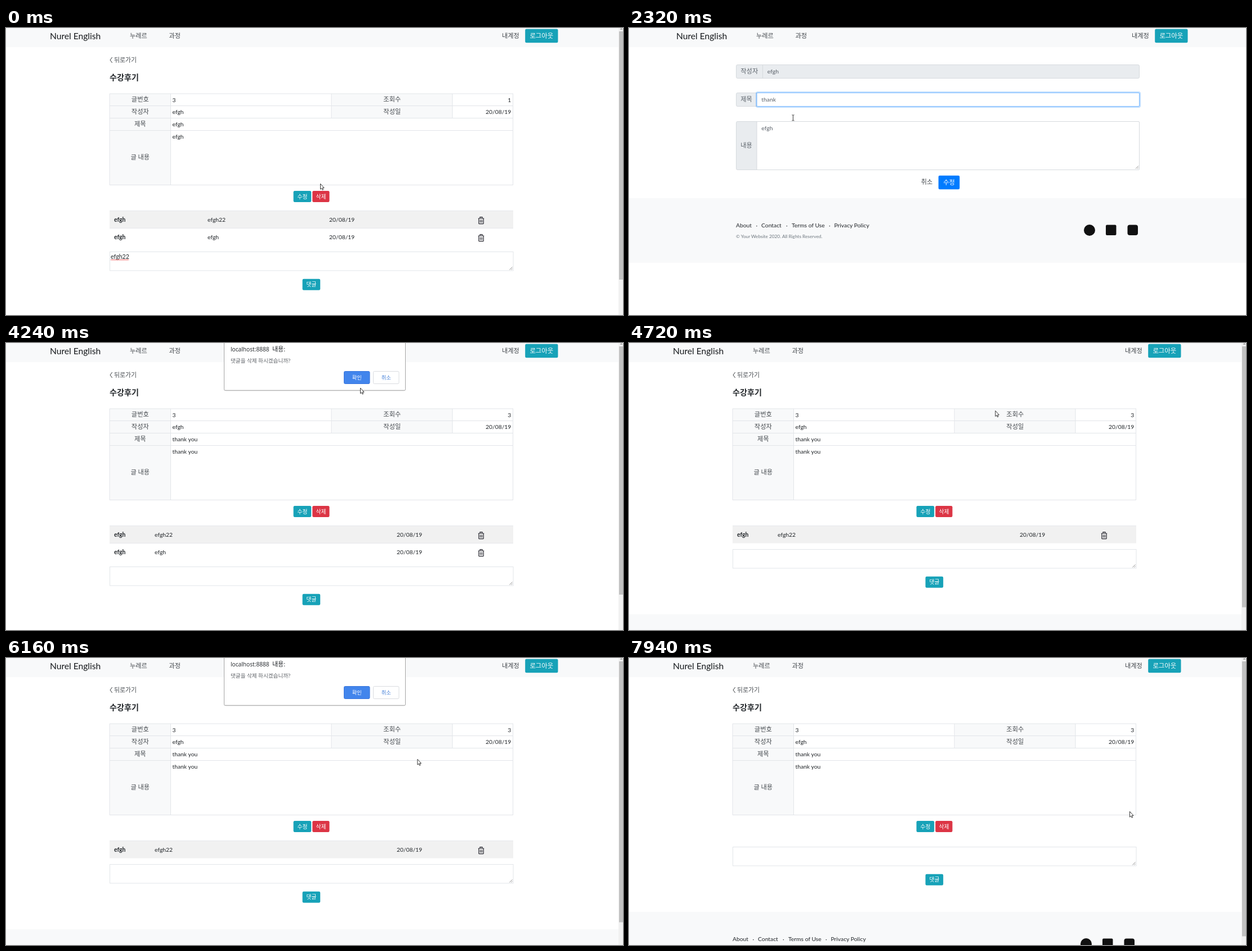
An HTML page for the animation above (8000 ms loop, 1096 px wide and 511 px high).

```html
<!DOCTYPE html>
<html lang="ko">
<head>
<meta charset="utf-8">
<title>수강후기</title>
<style>
  html, body { margin: 0; width: 100%; height: 100%; overflow: hidden; background: #fff; }
  svg { display: block; width: 1096px; height: 511px; }
  text { font-family: Lato, "Noto Sans CJK KR", "Noto Sans CJK", sans-serif; white-space: pre; }
  .ui { font-family: "Open Sans", "Noto Sans CJK KR", sans-serif; }
</style>
</head>
<body>
<svg viewBox="0 0 1096 511">
  <g id="page"></g>
  <circle id="click" r="9" fill="#ffdc1e" fill-opacity=".62"/>
  <g id="pointer"></g>
</svg>
<script>
const LOOP = 8000;
const BRAND = 'Nurel English', MENU = '누레르', USER = 'efgh';
const INK = '#212529', SOFT = '#44494e', MUTED = '#596068';
const LINE = '#e2e5e9', EDGE = '#d6dade', PALE = '#f8f9fa', TEAL = '#17a2b8';
const LATIN = 10.33, HANGUL = 11.2, SMALL = 9.8;

// time, changes to the state from then on
const STEPS = [
  [0, { page: 'view', views: 1, title: USER, body: USER, rows: 2, cols: [358, 574],
        draft: USER + '22', dialog: false, focus: '', selected: false }],
  [690, { focus: 'edit' }],
  [1090, { page: 'form', focus: '' }],
  [1850, { focus: 'title' }],
  [1990, { selected: true }],
  [2240, { selected: false, typing: 'title' }],
  [2420, { title: 'thank you', typing: 'body', focus: 'body' }],
  [2600, { body: 'thank you', typing: '' }],
  [2700, { page: 'view', views: 3, cols: [264, 694], draft: '', focus: '' }],
  [4050, { dialog: true }],
  [4430, { dialog: false }],
  [4570, { rows: 1 }],
  [5860, { dialog: true }],
  [7280, { dialog: false }],
  [7420, { rows: 0 }],
];

// time, x, y, pointer shape from then on
const PATH = [
  [0, 558, 277, 'arrow'], [80, 558, 277, 'arrow'], [200, 556, 293, 'hand'], [300, 550, 304, 'hand'],
  [420, 530, 306, 'hand'], [540, 522, 297, 'hand'], [1320, 522, 297, 'arrow'], [1400, 480, 258, 'beam'],
  [1560, 378, 166, 'arrow'], [1630, 355, 140, 'arrow'], [1780, 355, 140, 'arrow'], [1850, 343, 129, 'beam'],
  [2090, 219, 127, 'beam'], [2240, 219, 127, 'beam'], [2420, 380, 200, 'beam'], [2520, 560, 260, 'hand'],
  [2600, 565, 274, 'hand'], [2720, 564, 273, 'arrow'], [2850, 564, 273, 'arrow'], [3090, 572, 277, 'arrow'],
  [3500, 700, 318, 'arrow'], [3880, 825, 360, 'arrow'], [3960, 844, 371, 'arrow'], [4050, 844, 371, 'arrow'],
  [4240, 629, 80, 'arrow'], [4310, 629, 62, 'arrow'], [4450, 629, 62, 'arrow'], [4720, 650, 120, 'arrow'],
  [5000, 740, 232, 'arrow'], [5300, 861, 339, 'arrow'], [5540, 851, 344, 'arrow'], [5860, 850, 343, 'arrow'],
  [6150, 735, 185, 'arrow'], [6400, 632, 70, 'arrow'], [6540, 629, 64, 'arrow'], [6710, 629, 64, 'arrow'],
  [6780, 629, 62, 'arrow'], [7300, 629, 62, 'arrow'], [7500, 740, 110, 'arrow'], [7700, 866, 227, 'arrow'],
  [7780, 873, 241, 'arrow'], [7940, 889, 273, 'arrow'], [LOOP, 889, 273, 'arrow'],
];

const CLICKS = [[690, 810], [1850, 1990], [2610, 2700], [3960, 4050], [4320, 4430], [5770, 5860], [7100, 7280]];

const POINTERS = {
  arrow: '<path d="M.5 .3V10.2L2.7 8.2L4.1 11.4L5.7 10.7L4.3 7.6H7.1Z" fill="#fff" stroke="#222" stroke-width=".9"/>',
  hand: `<path d="M-1.1 9V1Q0 -.6 1.1 1V5Q2.4 4 3.2 5.4Q4.4 4.6 5.1 6Q6.7 5.6 6.6 7.4V10
    Q6.4 12 5.2 13.6H-.2Q-1.4 11.4 -3.6 9Q-4 7.2 -2.3 7.6Z" fill="#fff" stroke="#222" stroke-width=".9"/>`,
  beam: '<path d="M-2 -5H-.5L0 -4.5L.5 -5H2M0 -4.5V4.5M-2 5H-.5L0 4.5L.5 5H2" fill="none" stroke="#222" stroke-width=".9"/>',
};

const rect = (x, y, w, h, fill, more = '') =>
  `<rect x="${x}" y="${y}" width="${w}" height="${h}" fill="${fill}" ${more}/>`;
const box = (x, y, w, h, stroke = LINE, r = 0, fill = '#fff') =>
  rect(x + .5, y + .5, w - 1, h - 1, fill, `stroke="${stroke}" rx="${r}"`);
const text = (s, x, y, size = LATIN, fill = INK, more = '') =>
  `<text x="${x}" y="${y}" font-size="${size}" fill="${fill}" ${more}>${s}</text>`;
const centred = (s, x, y, size = HANGUL, fill = INK) => text(s, x, y, size, fill, 'text-anchor="middle"');
const right = (s, x, y) => text(s, x, y, LATIN, INK, 'text-anchor="end"');
const stroke = (d, color, width = 1) => `<path d="${d}" fill="none" stroke="${color}" stroke-width="${width}"/>`;
const ring = (x, y, w, h, color) => rect(x - 1, y - 1, w + 2, h + 2, 'none', `rx="3" stroke="${color}" stroke-width="2.2"`);
const button = (s, x, y, w, h, fill, size) =>
  rect(x, y, w, h, fill, 'rx="2.3"') + centred(s, x + w / 2, y + h / 2 + size * .37, size, '#fff');
const grip = (x, y) => stroke(`M${x - 7} ${y - 2}L${x - 2} ${y - 7}M${x - 4} ${y - 2}L${x - 2} ${y - 4}`, '#777', .8);
const inside = (p, x, y, w, h) => p.x >= x && p.x <= x + w && p.y >= y && p.y <= y + h;

function header(left, end) {
  return rect(0, 0, 1096, 34, PALE)
    + text(BRAND, left, 20, 15.6, '#16191c')
    + text(MENU, left + 142, 17.5, HANGUL, SOFT)
    + text('과정', left + 211.5, 17.5, HANGUL, SOFT)
    + text('내계정', end - 100, 17.5, HANGUL, SOFT)
    + button('로그아웃', end - 58.8, 1.7, 58.3, 24.6, TEAL, 11.4);
}

function footer(left, top) {
  const links = [['About', 0], ['·', 35.5], ['Contact', 45], ['·', 89], ['Terms of Use', 99], ['·', 165], ['Privacy Policy', 174.5]];
  return rect(0, top, 1096, 115, PALE)
    + links.map(([s, x]) => text(s, left + x, top + 52.3)).join('')
    + text('© Your Website 2020. All Rights Reserved.', left, top + 70.7, 8.25, '#6c757d')
    + `<circle cx="${left + 628}" cy="${top + 57}" r="10" fill="#111"/>`
    + rect(left + 657, top + 47.5, 18.5, 18.5, '#111', 'rx="2"')
    + rect(left + 695.5, top + 47.5, 18.5, 18.5, '#111', 'rx="4"');
}

function trash(y) {
  return `<g transform="translate(844 ${y})">`
    + stroke('M-5.2 -3.5H5.2M-2 -3.8V-5.8H2V-3.8M-4.2 -3.5V5.2Q-4.2 6.2 -3.2 6.2H3.2Q4.2 6.2 4.2 5.2V-3.5', '#2b2b33', 1.2)
    + stroke('M-1.9 -1V4M0 -1V4M1.9 -1V4', '#2b2b33', .9) + '</g>';
}

function comments(s) {
  let out = '';
  for (let i = 0; i < s.rows; i++) {
    const y = 325.5 + i * 31;
    if (!i) out += rect(184, y, 717, 31, '#f1f1f1');
    out += stroke(`M184 ${y}H901`, LINE, .8)
      + text(USER, 192, y + 19.5, LATIN, INK, 'font-weight="700"')
      + text(i ? USER : USER + '22', s.cols[0], y + 19.5)
      + text('20/08/19', s.cols[1], y + 19.5)
      + trash(y + 17);
  }
  return out;
}

function postTable(s) {
  const label = (str, x, y) => centred(str, x, y, HANGUL, SOFT);
  return rect(184, 117, 108.5, 162.5, PALE) + rect(578, 117, 215, 43.5, PALE)
    + stroke('M184 117H901M184 138.5H901M184 160.5H901M184 182.5H901M184 279.5H901'
      + 'M184 117V279.5M292.5 117V279.5M900.5 117V279.5M578 117V160.5M793 117V160.5', LINE)
    + label('글번호', 238.3, 131.3) + label('조회수', 685.8, 131.3)
    + label('작성자', 238.3, 153.3) + label('작성일', 685.8, 153.3)
    + label('제목', 238.3, 174.8) + label('글 내용', 238.3, 233.8)
    + text('3', 295.5, 131.5) + right(s.views, 897.3, 131.5)
    + text(USER, 295.5, 153.3) + right('20/08/19', 897.3, 153.3)
    + text(s.title, 295.5, 175) + text(s.body, 295.5, 197);
}

function dialog(p) {
  const hover = inside(p, 600, 50, 46, 23);
  return rect(388, -6, 321, 91.5, '#000', 'opacity=".13" rx="3"')
    + rect(387.5, -5, 322, 89.3, '#fff', 'stroke="#a5a5a5" rx="1.5"')
    + text('localhost:8888', 399, 15, 10.2, INK, 'class="ui"')
    + text('내용:', 473, 14.5, 11, INK, 'class="ui"')
    + text('댓글을 삭제 하시겠습니까?', 399, 35, 9.6, '#5f6368', 'class="ui"')
    + box(600, 50, 46.5, 23, hover ? '#4a8df0' : '#3774dc', 2, hover ? '#4c8ff1' : '#4285ec')
    + centred('확인', 623.3, 64.5, 9.3, '#fff')
    + box(652, 50, 46.5, 23, '#dadce0', 2)
    + centred('취소', 675.3, 64.5, 9.3, '#4680d8');
}

function viewPage(s, p) {
  const shift = (2 - s.rows) * 31;
  const bar = [495.5, 470.5, 448][s.rows];
  const edit = inside(p, 510.6, 290, 31.6, 20) || s.focus === 'edit';
  const remove = inside(p, 544.3, 290, 30.2, 20);
  const top = 398 - shift;
  return header(78, 981)
    + stroke('M188.7 52L185 57L188.7 62', INK, .9) + text('뒤로가기', 192, 60.5, 10.9, SOFT)
    + text('수강후기', 184, 92.8, 14.1, INK, 'font-weight="700"')
    + postTable(s)
    + (s.focus === 'edit' ? ring(510.6, 290, 31.6, 20, '#9dd8e1') : '')
    + button('수정', 510.6, 290, 31.6, 20, edit ? '#138496' : TEAL, SMALL)
    + button('삭제', 544.3, 290, 30.2, 20, remove ? '#c82333' : '#dc3545', SMALL)
    + comments(s)
    + box(184, top, 717.5, 34.5) + grip(901.5, top + 34.5)
    + (s.draft ? text(s.draft, 186, 411.3, 10.6)
      + stroke('M186 413.3' + 'l1 -1l1 1'.repeat(16), '#f03030', .9) : '')
    + button('댓글', 526.6, top + 48.7, 31.6, 20, TEAL, SMALL)
    + footer(184, 514 - shift)
    + rect(1088, 0, 8, 511, '#f1f1f1') + rect(1089, 6, 7, bar - 6, '#c1c1c1')
    + '<path d="M1090.5 2.8L1093 .3L1095.5 2.8Z" fill="#999"/>'
    + (s.dialog ? dialog(p) : '');
}

function field(label, value, y, h, split, opt = {}) {
  const edge = opt.focus ? '#80bdff' : EDGE;
  return box(190, y, 717, h, EDGE, 2.3, '#e9ecef')
    + (opt.off ? stroke(`M${split} ${y}V${y + h}`, EDGE) : box(split - .5, y, 907.5 - split, h, edge, 1.5))
    + (opt.focus ? ring(split, y, 907 - split, h, 'rgba(0,123,255,.25)') : '')
    + centred(label, (190 + split) / 2, y + h / 2 + 3.5, HANGUL, MUTED)
    + (opt.selected ? rect(split + 8, y + 6, 21.5, 13, '#3390ff') : '')
    + text(value, split + 8.3, y + 16.3, LATIN, opt.selected ? '#fff' : MUTED);
}

function formPage(s, p) {
  const save = inside(p, 549.7, 262.8, 37.6, 24.4);
  return header(84, 993)
    + field('작성자', USER, 65, 25, 237.5, { off: true })
    + field('제목', s.title, 115, 25, 227, { focus: s.focus === 'title', selected: s.selected })
    + field('내용', s.body, 166, 87, 227, { focus: s.focus === 'body' })
    + grip(907, 252.5)
    + text('취소', 518.7, 278.3, HANGUL, SOFT)
    + button('수정', 549.7, 262.8, 37.6, 24.4, save ? '#0069d9' : '#007bff', HANGUL)
    + footer(190, 303);
}

function stateAt(t) {
  const s = {};
  let since = 0;
  for (const [at, change] of STEPS) {
    if (at > t) break;
    Object.assign(s, change);
    since = at;
  }
  if (s.typing) s[s.typing] = 'thank you'.slice(0, 1 + Math.floor((t - since) / 20));
  return s;
}

function pointerAt(t) {
  let i = 0;
  while (i < PATH.length - 2 && PATH[i + 1][0] <= t) i++;
  const [t0, x0, y0, kind] = PATH[i], [t1, x1, y1] = PATH[i + 1];
  const k = (t - t0) / (t1 - t0);
  return { x: x0 + (x1 - x0) * k, y: y0 + (y1 - y0) * k, kind };
}

const $ = id => document.getElementById(id);
let shown = '', shape = '';

function draw(t) {
  const s = stateAt(t), p = pointerAt(t);
  const markup = s.page === 'view' ? viewPage(s, p) : formPage(s, p);
  if (markup !== shown) $('page').innerHTML = shown = markup;
  if (p.kind !== shape) $('pointer').innerHTML = POINTERS[shape = p.kind];
  const place = `translate(${p.x} ${p.y})`;
  $('pointer').setAttribute('transform', place);
  $('click').setAttribute('transform', place);
  $('click').style.display = CLICKS.some(([a, b]) => t >= a && t < b) ? '' : 'none';
}

const start = performance.now();
function tick() {
  draw((performance.now() - start) % LOOP);
  requestAnimationFrame(tick);
}
tick();
</script>
</body>
</html>
```
